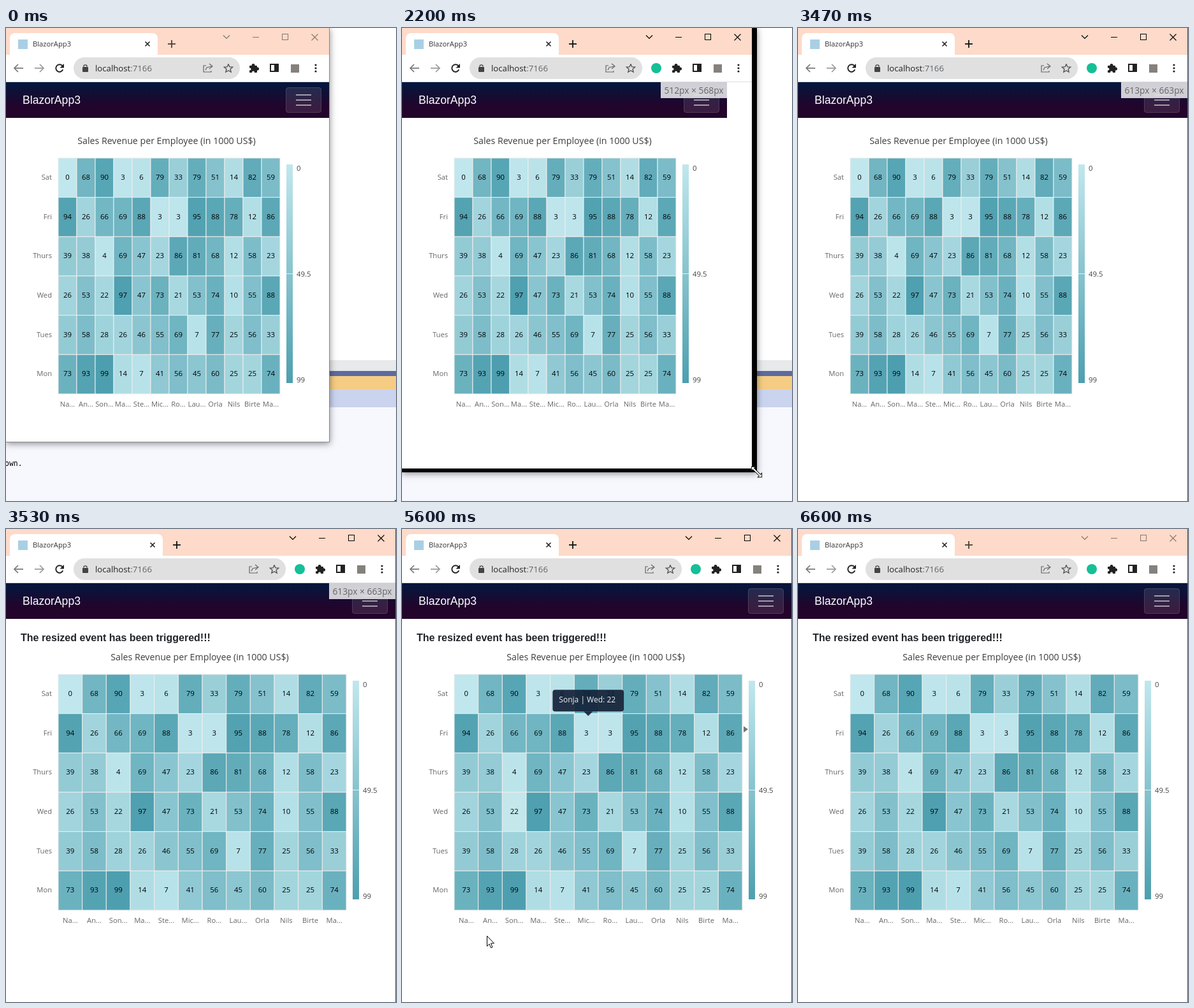
Write an HTML page with a canvas that moves like this. It is 612 by 742 pixels and loops after 6.79 s.

```html
<!DOCTYPE html>
<html lang="en">
<head>
<meta charset="utf-8">
<title>Heat map resize</title>
<style>
html, body { margin: 0; width: 100%; height: 100%; overflow: hidden; background: #fff; }
canvas { display: block; }
</style>
</head>
<body>
<canvas id="stage" width="612" height="742"></canvas>
<script>
const c = document.getElementById('stage').getContext('2d');
const LOOP = 6790, TICK = 200 / 3;
const UI = '"Open Sans", "Noto Sans", sans-serif';
const ARIAL = '"Liberation Sans", Arial, sans-serif';
const days = ['Sat', 'Fri', 'Thurs', 'Wed', 'Tues', 'Mon'];
const people = ['Na...', 'An...', 'Son...', 'Ma...', 'Ste...', 'Mic...', 'Ro...', 'Lau...', 'Orla', 'Nils', 'Birte', 'Ma...'];
const sales = [
  [0, 68, 90, 3, 6, 79, 33, 79, 51, 14, 82, 59],
  [94, 26, 66, 69, 88, 3, 3, 95, 88, 78, 12, 86],
  [39, 38, 4, 69, 47, 23, 86, 81, 68, 12, 58, 23],
  [26, 53, 22, 97, 47, 73, 21, 53, 74, 10, 55, 88],
  [39, 58, 28, 26, 46, 55, 69, 7, 77, 25, 56, 33],
  [73, 93, 99, 14, 7, 41, 56, 45, 60, 25, 25, 74]
];

// pointer way points: time, x, y
const arrival = [[0, 610, 740], [330, 622, 754], [1070, 510, 650]];
const tour = [[4000, 608, 738], [4470, 101, 167], [4730, 32, 172], [4800, 32, 172], [5000, 272, 172],
  [5270, 272, 172], [5400, 322, 300], [5600, 133, 638], [6200, 150, 745]];

const mix = (a, b, p) => a + (b - a) * p;
const part = (t, from, to) => Math.min(1, Math.max(0, (t - from) / (to - from)));
function follow(path, t) {
  const i = Math.max(1, path.findIndex(k => k[0] >= t) + 1 || path.length) - 1;
  const a = path[Math.max(0, i - 1)], b = path[i], p = part(t, a[0], b[0] + 0.001);
  return [mix(a[1], b[1], p), mix(a[2], b[2], p)];
}

function rect(x, y, w, h, color) {
  c.fillStyle = color;
  c.fillRect(x, y, w, h);
}
function round(x, y, w, h, r, color) {
  c.beginPath();
  c.roundRect(x, y, w, h, r);
  c.fillStyle = color;
  c.fill();
}
function circle(x, y, r, color) {
  c.beginPath();
  c.arc(x, y, r, 0, 7);
  c.fillStyle = color;
  c.fill();
}
function text(s, x, y, size, color, align = 'left', family = UI, weight = '') {
  c.font = `${weight} ${size}px ${family}`;
  c.textAlign = align;
  c.fillStyle = color;
  c.fillText(s, x, y);
}
function trace(points) {
  c.beginPath();
  for (let i = 0; i < points.length; i += 2) c.lineTo(points[i], points[i + 1]);
}
function stroke(color, width = 1) {
  c.strokeStyle = color;
  c.lineWidth = width;
  c.stroke();
}
function line(points, color, width) {
  trace(points);
  stroke(color, width);
}
function shape(points, fill, edge) {
  trace(points);
  c.closePath();
  c.fillStyle = fill;
  c.fill();
  if (edge) stroke(edge);
}
function cross(x, y, r, color, width) {
  line([x - r, y - r, x + r, y + r], color, width);
  line([x + r, y - r, x - r, y + r], color, width);
}
function shade(v) {
  const tone = (a, b) => Math.round(mix(a, b, v / 99));
  return `rgb(${tone(192, 77)},${tone(231, 159)},${tone(237, 175)})`;
}

function desktop() {
  rect(0, 0, 612, 742, '#fff');
  rect(0, 521, 612, 17, '#e7e9ea');
  rect(0, 538, 612, 8, '#5d6a9e');
  rect(0, 546, 612, 21, '#f5cc84');
  rect(0, 567, 612, 28, '#cad4ef');
  rect(0, 595, 612, 147, '#f7f8fe');
  text('own.', -2, 687, 11.5, '#000', 'left', '"DejaVu Sans Mono", monospace');
}

function titleBar(right, shift, ink) {
  rect(0, 0, right, 42, '#fddac9');
  round(6, 8, 232 + shift, 40, 8, '#fff');
  rect(19, 18, 15, 15, '#a9cfe4');
  text('BlazorApp3', 42, 29, 11.2, '#333');
  cross(222 + shift, 25, 3.5, '#222', 1.6);
  const px = 260 + shift, plus = ink === '#000' ? '#111' : '#4b403c';
  line([px - 6, 25, px + 6, 25], plus, 1.8);
  line([px, 19, px, 31], plus, 1.8);
  line([right - 166, 11.5, right - 161, 16.5, right - 156, 11.5], ink, 1.2);
  line([right - 120, 14.5, right - 110, 14.5], ink);
  c.strokeRect(right - 73.5, 9.5, 9, 9);
  cross(right - 22.5, 14.5, 5, ink, 1.1);
}

function toolbar(right, wide) {
  rect(0, 42, right, 42, '#fff');
  for (const [x, d, color] of [[20, -1, '#777'], [52, 1, '#999']]) {
    line([x - 7, 63, x + 7, 63], color, 1.7);
    line([x + d, 57, x + 7 * d, 63, x + d, 69], color, 1.7);
  }
  c.beginPath();
  c.arc(84, 63, 5.7, 0.4, 5.6);
  stroke('#222', 1.9);
  shape([91, 56, 91, 62.5, 84.5, 62.5], '#222');

  const end = right - (wide ? 172 : 140);
  round(106, 46, end - 106, 34, 17, '#e0e0e0');
  round(120, 61, 9, 8, 1, '#444');
  c.beginPath();
  c.arc(124.5, 60.5, 2.6, Math.PI, 0);
  stroke('#444', 1.4);
  text('localhost', 140, 68, 13.2, '#222');
  text(':7166', 140 + c.measureText('localhost').width, 68, 13.2, '#5f6368');

  const sx = end - 50, star = [];
  line([sx - 3, 59, sx - 7, 59, sx - 7, 69, sx + 5, 69, sx + 5, 67], '#666', 1.2);
  line([sx - 4, 66, sx - 2, 62, sx + 6, 60], '#666', 1.2);
  line([sx + 2, 56, sx + 7, 60, sx + 2, 64], '#666', 1.2);
  for (let i = 0; i <= 10; i++) {
    const a = i * Math.PI / 5, r = i % 2 ? 3.2 : 7;
    star.push(end - 18 + r * Math.sin(a), 63.5 - r * Math.cos(a));
  }
  line(star, '#555', 1.4);
  if (wide) circle(right - 150, 63, 8, '#16bf97');

  const px = right - 118;
  round(px - 7, 59, 12, 11, 1, '#222');
  circle(px - 1, 58.5, 2.5, '#222');
  circle(px + 5.5, 64, 2.5, '#222');
  circle(px - 6.5, 64.5, 2, '#fff');
  circle(px - 1, 69.5, 2, '#fff');
  c.strokeStyle = '#222';
  c.lineWidth = 2;
  c.strokeRect(right - 92, 57, 12, 11);
  rect(right - 86, 57, 6, 11, '#222');
  rect(right - 60, 57, 13, 13, '#85817d');
  for (const y of [58, 63, 68]) circle(right - 21, y, 1.6, '#222');
  rect(0, 84, right, 1, '#dcdcdc');
}

function navBar(width, label) {
  const g = c.createLinearGradient(0, 85, 0, 141);
  g.addColorStop(0, '#03173e');
  g.addColorStop(0.7, '#23042b');
  rect(0, 85, width, 56, g);
  text('BlazorApp3', 26, 119, 17.6, '#fff', 'left', ARIAL);
  const x = width - 68;
  round(x, 93, 56, 40, 4, 'rgba(255,255,255,.1)');
  c.beginPath();
  c.roundRect(x + 0.5, 93.5, 55, 39, 4);
  stroke('rgba(255,255,255,.12)');
  for (const y of [104, 112, 120]) rect(x + 16, y, 24, 2, 'rgba(255,255,255,.55)');
  if (label) {
    rect(width - 104, 85, 104, 25, 'rgba(225,224,227,.92)');
    text(label, width - 52, 103, 13.8, '#666', 'center');
  }
}

function chart(resized, hover) {
  const top = resized ? 228 : 204, width = resized ? 452 : 348;
  const cw = width / 12, ch = 370 / 6, lx = 92 + width;
  text('Sales Revenue per Employee (in 1000 US$)', 78 + width / 2, top - 22, 14.2, '#3c3c3c', 'center');
  sales.forEach((row, r) => {
    const y = top + r * ch, base = y + ch / 2 + 3;
    text(days[r], 72, base, 11.2, '#666', 'right');
    row.forEach((v, k) => {
      const x = 82 + k * cw, lit = hover && hover.col === k && hover.row === r;
      rect(x, y, cw, ch, lit ? '#c3e7eb' : shade(v));
      c.strokeStyle = '#eee';
      c.lineWidth = 1;
      c.strokeRect(x, y, cw, ch);
      text(v, x + cw / 2, base, 11.4, '#000', 'center');
    });
  });
  people.forEach((s, k) => text(s, 82 + (k + 0.5) * cw, top + 390, 11.2, '#666', 'center'));

  const g = c.createLinearGradient(0, top + 10, 0, top + 353);
  g.addColorStop(0, shade(0));
  g.addColorStop(1, shade(99));
  rect(lx, top + 10, 10, 343, g);
  rect(lx, top + 181, 10, 1, '#eee');
  ['0', '49.5', '99'].forEach((s, i) => text(s, lx + 16, top + 20 + i * 166, 11.4, '#444'));
  if (hover) {
    const y = top + 10 + sales[hover.row][hover.col] / 99 * 343;
    shape([lx - 8, y - 5, lx - 1, y, lx - 8, y + 5], '#777');
  }
}

function hovered(t) {
  if (t < 5400 || t >= 6200) return null;
  if (t < 5530) return { col: 6, row: 1, name: 'Rowan' };
  return t < 5670 ? { col: 2, row: 3, name: 'Sonja' } : { col: 1, row: 5, name: 'Answin' };
}

function tooltip(t, { col, row, name }) {
  const p = part(t, 5400, 6000) ** 1.5;
  const x = mix(329, 138, p), y = mix(197, 484, p), dark = 'rgba(18,31,54,.91)';
  const label = `${name} | ${days[row]}: ${sales[row][col]}`;
  c.globalAlpha = 1 - part(t, 6000, 6200);
  c.font = `12px ${UI}`;
  const w = c.measureText(label).width + 23;
  round(x - w / 2, y, w, 34, 4, dark);
  shape([x - 7, y + 34, x + 7, y + 34, x, y + 41], dark);
  text(label, x - 1.5, y + 20, 12, '#eef1f5', 'center');
  c.globalAlpha = 1;
}

function pointer(t, corner) {
  const resizing = t >= 1070 && t < 4000;
  const [x, y] = resizing ? corner : follow(t < 1070 ? arrival : tour, t);
  c.save();
  c.translate(x, y);
  if (resizing) {
    if (t >= 1670) c.rotate(Math.PI / 4);
    shape([-11.5, 0, -7, -4.5, -7, -1.5, 7, -1.5, 7, -4.5, 11.5, 0, 7, 4.5, 7, 1.5, -7, 1.5, -7, 4.5], '#fff', '#111');
  } else if (t >= 4470 && t < 5330) {
    line([-3.5, -7.5, 3.5, -7.5], '#000');
    line([0.5, -7.5, 0.5, 7.5], '#000');
    line([-3.5, 7.5, 3.5, 7.5], '#000');
  } else {
    shape([0.5, 0.5, 0.5, 16.5, 4, 13, 6.5, 19, 9, 18, 6.5, 12, 11.5, 12], '#fff', '#000');
  }
  c.restore();
}

function draw(now) {
  const tick = Math.floor((now % LOOP + 4) / TICK);
  const t = Math.round(tick * TICK / 10) * 10;

  // the window follows the drag; the page inside catches up in jumps
  const drag = part(t, 2070, 2330), full = t >= 2470;
  const right = full ? 611 : Math.round(mix(507, 591, drag));
  const bottom = full ? 750 : Math.round(mix(649, 733, drag));
  const dragging = t >= 2130 && t < 2600, wide = t >= 2130;
  const pageWidth = !wide ? 507 : dragging ? 510 : t < 2930 ? 563 : 611;
  const sized = wide && t < 4000;
  const label = sized ? `${pageWidth + 2}px × ${dragging ? 568 : 663}px` : '';
  const ink = t < 2070 || t >= 6600 ? '#86766f' : t >= 6530 ? '#4a403c' : '#000';
  const resized = t >= 3530, hover = hovered(t);

  desktop();
  c.save();
  c.shadowColor = 'rgba(0,0,0,.45)';
  c.shadowBlur = 10;
  c.shadowOffsetY = 2;
  if (dragging) rect(0, 0, right + 8, bottom + 6, '#000');
  else rect(0, 0, right + 1, bottom + 1, t < 2070 ? '#8b8b8b' : '#555');
  c.restore();
  rect(0, 0, right, bottom, '#fff');
  titleBar(right, wide ? 8 : 0, ink);
  toolbar(right, wide);
  navBar(pageWidth, label);
  if (resized) text('The resized event has been triggered!!!', 23, 176, 16, '#212529', 'left', ARIAL, 'bold');
  chart(resized, t < 6070 && hover);
  if (hover) tooltip(t, hover);
  pointer(t, [right + 3 + 9 * drag, bottom + 2 + 7 * drag]);
}

const start = performance.now();
function frame() {
  draw(performance.now() - start);
  requestAnimationFrame(frame);
}
frame();
</script>
</body>
</html>
```
